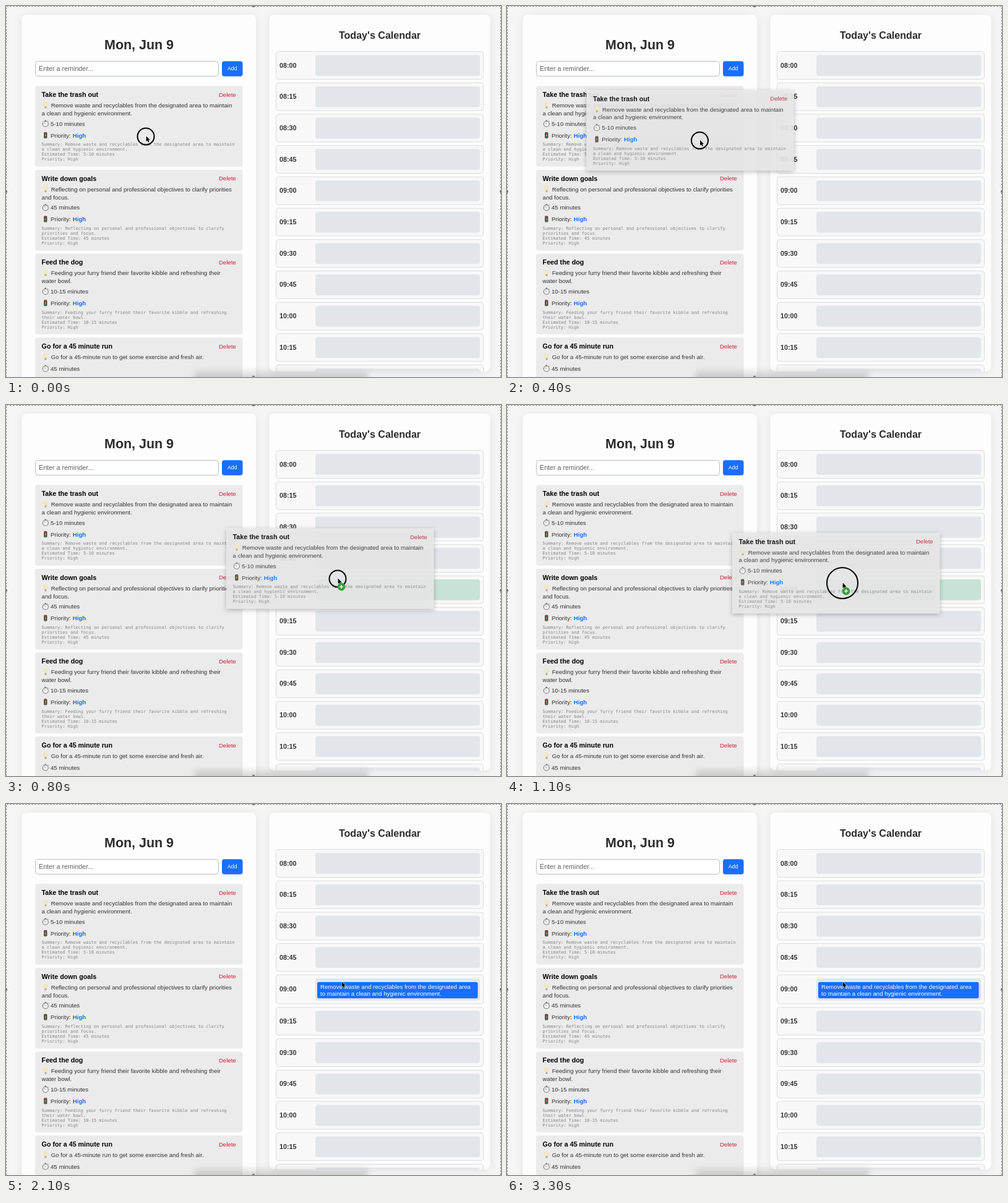
An HTML page with a canvas for the animation above (3400 ms loop, 800x600 px).

```html
<!DOCTYPE html>
<html lang="en">
<head>
<meta charset="utf-8">
<title>Reminders and calendar</title>
<style>
html, body { margin: 0; width: 100%; height: 100%; overflow: hidden; background: #f5f5f5; }
canvas { display: block; }
</style>
</head>
<body>
<canvas id="stage" width="800" height="600"></canvas>
<script>
const ctx = document.getElementById('stage').getContext('2d');
const SANS = '"Liberation Sans", Arial, sans-serif';
const MONO = '"DejaVu Sans Mono", monospace';
const BLUE = '#1a6dff';
const LOOP = 3400, STEP = 100, DROP = 1300;

const tasks = [
  { title: 'Take the trash out', time: '5-10 minutes',
    lines: ['Remove waste and recyclables from the designated area to maintain', 'a clean and hygienic environment.'],
    summary: ['Remove waste and recyclables from the designated area to maintain', 'a clean and hygienic environment.'] },
  { title: 'Write down goals', time: '45 minutes',
    lines: ['Reflecting on personal and professional objectives to clarify priorities', 'and focus.'],
    summary: ['Reflecting on personal and professional objectives to clarify', 'priorities and focus.'] },
  { title: 'Feed the dog', time: '10-15 minutes',
    lines: ['Feeding your furry friend their favorite kibble and refreshing their', 'water bowl.'],
    summary: ['Feeding your furry friend their favorite kibble and refreshing', 'their water bowl.'] },
  { title: 'Go for a 45 minute run', time: '45 minutes',
    lines: ['Go for a 45-minute run to get some exercise and fresh air.'],
    summary: ['Go for a 45-minute run to get some exercise and fresh air.'] }
];

// One position per step; the dragged card trails the pointer slightly.
const pointer = [[226, 211], [228, 211], [240, 211.5], [268, 213.5], [311.5, 217.5], [396, 232],
  [478, 250], [520, 268], [536, 281], [541, 287], [542, 288]];
const ghost = [[0, 0], [2, 0], [13, 0.5], [40, 2.5], [81.3, 6.4], [157, 18],
  [236.5, 32.5], [288, 56], [309, 70], [316, 76.5], [317, 77.5]];

function box(x, y, w, h, r, fill, stroke) {
  ctx.beginPath();
  ctx.roundRect(x, y, w, h, r);
  ctx.fillStyle = fill;
  ctx.fill();
  if (stroke) {
    ctx.strokeStyle = stroke;
    ctx.lineWidth = 1;
    ctx.stroke();
  }
}

function shadowBox(x, y, w, h, r, fill, blur, alpha) {
  ctx.save();
  ctx.shadowColor = `rgba(0,0,0,${alpha})`;
  ctx.shadowBlur = blur;
  ctx.shadowOffsetY = 2;
  box(x, y, w, h, r, fill);
  ctx.restore();
}

function disc(x, y, r, fill, stroke, width = 1) {
  ctx.beginPath();
  ctx.arc(x, y, r, 0, 7);
  if (fill) { ctx.fillStyle = fill; ctx.fill(); }
  if (stroke) { ctx.strokeStyle = stroke; ctx.lineWidth = width; ctx.stroke(); }
}

function line(color, width, ...points) {
  ctx.beginPath();
  points.forEach(p => ctx.lineTo(...p));
  ctx.strokeStyle = color;
  ctx.lineWidth = width;
  ctx.stroke();
}

function text(str, x, y, size, color, weight = '', align = 'left', family = SANS) {
  ctx.font = `${weight} ${size}px ${family}`;
  ctx.textAlign = align;
  ctx.fillStyle = color;
  ctx.fillText(str, x, y);
}

function bulb(x, y) {
  disc(x, y - 1.8, 3.3, '#f5eab8', '#e6dcae', 0.6);
  box(x - 1.5, y + 1.6, 3, 3.2, 1, '#aaa79d');
}

function stopwatch(x, y) {
  disc(x, y + 0.6, 4.5, '#f3f3f3', '#777', 1.1);
  box(x - 1.2, y - 5.8, 2.4, 1.6, 0.5, '#777');
  line('#777', 1, [x + 3.6, y - 4.2], [x + 4.8, y - 3]);
  line('#666', 0.8, [x, y + 0.6], [x - 1.8, y - 1.6]);
}

function trafficLight(x, y) {
  box(x - 2.6, y - 5, 5.2, 10, 1.5, '#41403f');
  ['#d8483e', '#d5a33b', '#4c9a5a'].forEach((c, i) => disc(x, y - 3 + i * 3, 1.2, c));
}

function card(task, y) {
  const x = 57.6, two = task.lines.length > 1;
  const timeY = y + (two ? 64.5 : 53.7);
  text(task.title, x, y + 17.9, 10.72, '#000', 'bold');
  text('Delete', 371.7, y + 17.4, 9.65, '#cc2239', '', 'right');
  bulb(64, y + 31.5);
  text(task.lines[0], 72.7, y + 34.8, 9.65, '#333');
  if (two) text(task.lines[1], x, y + 47.6, 9.65, '#333');
  stopwatch(63.8, timeY - 3.6);
  text(task.time, 72, timeY, 9.65, '#333');
  trafficLight(63.8, timeY + 15.2);
  text('Priority:', 72, timeY + 18.8, 9.65, '#333');
  text('High', 107.8, timeY + 18.8, 9.65, '#0d6efd', 'bold');
  const [first, ...rest] = task.summary;
  ['Summary: ' + first, ...rest, 'Estimated Time: ' + task.time, 'Priority: High'].forEach((s, i) =>
    text(s, x, timeY + 32.6 + i * 8, 7, '#858585', '', 'left', MONO));
}

function reminders() {
  shadowBox(25.5, 14, 378.5, 640, 8, '#fdfdfd', 14, 0.08);
  text('Mon, Jun 9', 215, 70, 21.44, '#2b2b2b', 'bold', 'center');
  box(47.5, 89.5, 296, 24, 4, '#fff', '#b9bcc4');
  text('Enter a reminder...', 53, 104.8, 10.72, '#606060');
  box(349, 89.3, 33.5, 24.4, 4, BLUE);
  text('Add', 365.6, 104.3, 8.93, '#fff', '', 'center');
  tasks.forEach((task, i) => {
    const y = 129.3 + i * 135.6;
    box(47, y, 335.5, 130.5, 4, '#ebebeb');
    card(task, y);
  });
}

function calendar(hover, dropped) {
  shadowBox(425.5, 14, 357, 577, 8, '#fdfdfd', 14, 0.08);
  text("Today's Calendar", 604, 53, 16.08, '#2b2b2b', 'bold', 'center');
  ctx.save();
  ctx.beginPath();
  ctx.rect(425, 14, 358, 577);
  ctx.clip();
  for (let i = 0; i < 11; i++) {
    const here = i === 4, grow = dropped && here ? 1.9 : 0;
    const y = 73.5 + i * 50.7 + (dropped && i > 4 ? 1.9 : 0);
    const label = `${String(8 + (i >> 2)).padStart(2, '0')}:${String(i % 4 * 15).padStart(2, '0')}`;
    box(436.5, y, 335, 45 + grow, 4, '#f8f8f8', '#dcdcde');
    box(500, y + 5.7, 266, 33.8 + grow, 4, here && hover ? '#c8e2d6' : '#e2e6ea');
    text(label, 442, y + 26 + grow / 2, 10.72, '#333', 'bold');
  }
  if (dropped) {
    box(503, 288, 259.5, 26.3, 2.5, BLUE);
    text('Remove waste and recyclables from the designated area', 508, 299, 9.65, '#fff');
    text('to maintain a clean and hygienic environment.', 508, 310, 9.65, '#fff');
  }
  ctx.restore();
}

function selectionFrame() {
  const glow = ctx.createLinearGradient(0, 586, 0, 600);
  glow.addColorStop(0, 'rgba(0,0,0,0)');
  glow.addColorStop(1, 'rgba(0,0,0,.16)');
  ctx.save();
  ctx.filter = 'blur(5px)';
  ctx.fillStyle = glow;
  ctx.fillRect(305, 586, 280, 24);
  ctx.restore();
  ctx.setLineDash([3, 2]);
  line('#8f8f8f', 1, [0.5, 600], [0.5, 0.5], [799.5, 0.5], [799.5, 600]);
  ctx.setLineDash([]);
  [[400, 0], [0, 300], [800, 300], [400, 600]].forEach(p => disc(...p, 2.2, '#777'));
}

function arrow(x, y) {
  const shape = [[0, 0], [0, 8.6], [2, 6.8], [3.5, 10], [5, 9.3], [3.6, 6.2], [6.2, 6.1]];
  ctx.beginPath();
  shape.forEach(([dx, dy]) => ctx.lineTo(x + dx, y + dy));
  ctx.closePath();
  ctx.lineJoin = 'round';
  ctx.strokeStyle = 'rgba(255,255,255,.8)';
  ctx.lineWidth = 1.2;
  ctx.stroke();
  ctx.fillStyle = '#000';
  ctx.fill();
}

function draw(t) {
  const i = Math.min(Math.floor(t / STEP), pointer.length - 1);
  const [x, y] = pointer[i];
  const dropped = t >= DROP, hover = t >= 800 && !dropped;

  ctx.fillStyle = '#f5f5f5';
  ctx.fillRect(0, 0, 800, 600);
  reminders();
  calendar(hover, dropped);
  selectionFrame();

  if (t >= 200 && !dropped) {
    ctx.save();
    ctx.globalAlpha = 0.91;
    ctx.translate(...ghost[i]);
    shadowBox(47, 129.3, 335.5, 130.5, 1, '#ebebeb', 7, 0.28);
    card(tasks[0], 129.3);
    ctx.restore();
  }
  if (t < 1200) disc(x, y, t < 1100 ? 13.5 : 25, null, '#000', 2);
  arrow(x + 0.6, y - 0.4);
  if (hover) {
    disc(x + 6, y + 13, 6, '#35a03a', '#2a8a30', 0.6);
    line('#fff', 1.3, [x + 3, y + 13], [x + 9, y + 13]);
    line('#fff', 1.3, [x + 6, y + 10], [x + 6, y + 16]);
  }
}

const start = performance.now();
function tick() {
  draw((performance.now() - start) % LOOP);
  requestAnimationFrame(tick);
}
tick();
</script>
</body>
</html>
```
